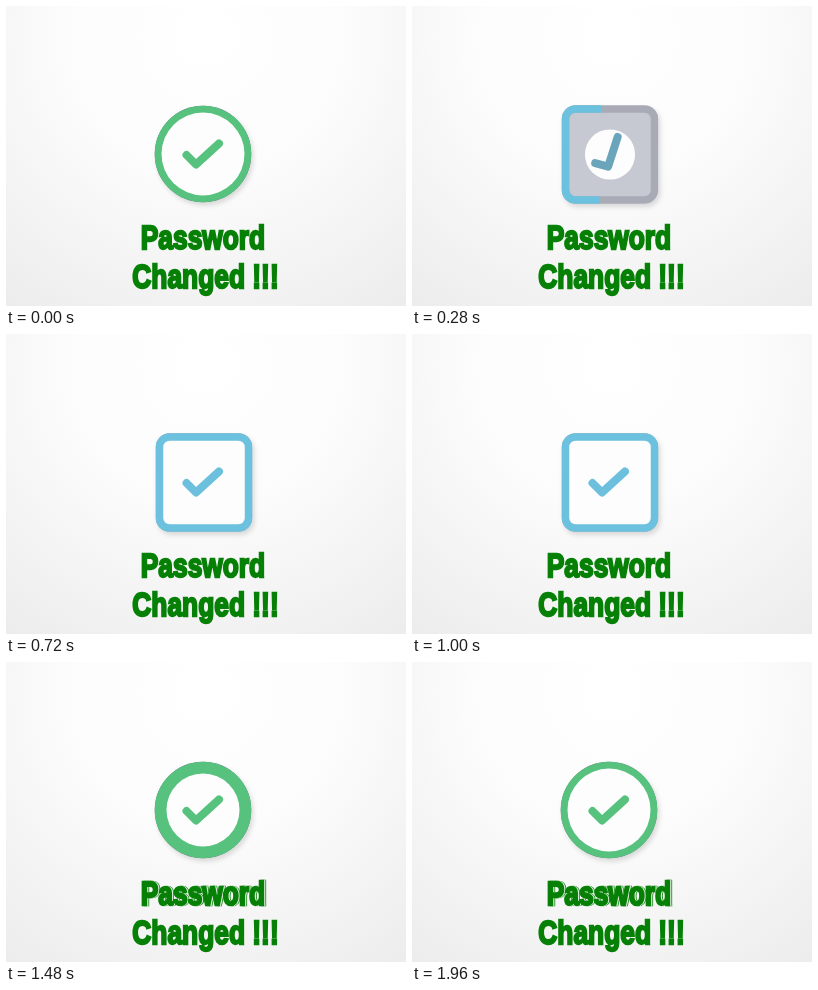
An HTML page that plays this animation: 400 by 300 pixels, repeating every 2 s.

```html
<!DOCTYPE html>
<html lang="en">
<head>
<meta charset="utf-8">
<title>Password changed</title>
<style>
html, body { margin: 0; width: 100%; height: 100%; overflow: hidden; background: #fff; }
svg { display: block; width: 100vw; height: 100vh; }
text {
  font: bold 34px "Liberation Sans", Arial, sans-serif;
  text-anchor: middle;
  stroke-width: 2.3;
}
.ink { fill: #068006; stroke: #068006; }
.pale { fill: #dceadc; stroke: #dceadc; }
</style>
</head>
<body>
<svg viewBox="0 0 400 300">
  <defs>
    <radialGradient id="paper" gradientUnits="userSpaceOnUse" cx="200" cy="30" r="350">
      <stop offset="0" stop-color="#fff"/>
      <stop offset=".4" stop-color="#fcfcfc"/>
      <stop offset="1" stop-color="#ebebeb"/>
    </radialGradient>
    <filter id="shadow" x="-20%" y="-20%" width="150%" height="150%">
      <feDropShadow dx="2" dy="3" stdDeviation="2.5" flood-color="#000" flood-opacity=".14"/>
    </filter>
    <clipPath id="window"><rect id="windowShape"/></clipPath>
  </defs>

  <rect width="400" height="300" fill="url(#paper)"/>

  <g id="square" fill="none" stroke-width="7.5">
    <rect x="153.5" y="103" width="89" height="91" rx="10" fill="#c6c8d2" stroke="#a8abb6" filter="url(#shadow)"/>
    <rect id="squareHole" fill="#fdfdfd"/>
    <path id="progress" stroke="#6cc1de" pathLength="343"
      d="M198 194H163.500a10 10 0 0 1-10-10V113a10 10 0 0 1 10-10H232.500a10 10 0 0 1 10 10V184a10 10 0 0 1-10 10Z"/>
  </g>

  <g id="circle">
    <circle cx="197" cy="148" r="46.500" fill="#f9fafb" stroke="#6b7088" stroke-width="3.500" filter="url(#shadow)"/>
    <circle id="disk" cx="197" cy="148" fill="#57c27d"/>
    <circle id="diskHole" cx="197" cy="148" fill="#fdfdfd"/>
  </g>

  <g clip-path="url(#window)">
    <path id="check" d="M180.500 149L190 158.500L213 137.500" fill="none" stroke-width="8" stroke-linejoin="round" stroke-linecap="round"/>
  </g>

  <!-- condensed poster lettering -->
  <g id="ghost">
    <text class="ink" transform="translate(199 242.8) scale(.775 1)">Password</text>
    <text class="pale" transform="translate(198.200 242.8) scale(.775 1)">Password</text>
  </g>
  <text class="ink" transform="translate(197 242.8) scale(.775 1)">Password</text>
  <text class="ink" transform="translate(199.500 281.8) scale(.775 1)">Changed !!!</text>
</svg>

<script>
const LOOP = 2000, SQUARE_START = 40, CIRCLE_START = 1040;
const el = id => document.getElementById(id);
const set = (id, attrs) => {
  for (const name in attrs) el(id).setAttribute(name, attrs[name]);
};
const show = (id, on) => set(id, { display: on ? "inline" : "none" });

// Piecewise linear value through [time, value] points.
function track(t, ...points) {
  if (t <= points[0][0]) return points[0][1];
  for (let i = 1; i < points.length; i++) {
    const [t0, a] = points[i - 1], [t1, b] = points[i];
    if (t <= t1) return a + (b - a) * (t - t0) / (t1 - t0);
  }
  return points[points.length - 1][1];
}

const box = (cx, cy, half, radius) => ({
  x: cx - half, y: cy - half, width: 2 * half, height: 2 * half, rx: radius
});

function drawSquare(t) {
  const half = track(t, [0, 0], [240, 25], [480, 38.5], [600, 43]);
  const radius = Math.min(half, track(t, [240, 25], [480, 10], [600, 7]));
  const hole = box(198, 148.5, half, radius);
  set("squareHole", hole);
  set("windowShape", hole);

  const length = track(t, [0, 6], [240, 152], [480, 297], [560, 343]);
  const start = track(t, [0, -58], [240, 10], [480, 78], [560, 100]);
  set("progress", {
    "stroke-dasharray": length >= 343 ? "none" : `${length} ${343 - length}`,
    "stroke-dashoffset": -start
  });

  const tone = track(t, [0, 0], [480, 1]);
  const mix = (a, b) => Math.round(a + (b - a) * tone);
  return `rgb(${mix(106, 108)},${mix(138, 192)},${mix(152, 221)})`;
}

function drawCircle(t) {
  const hole = track(t, [120, 0], [240, 14], [440, 36.5], [600, 41.5]);
  set("disk", { r: track(t, [0, 0], [240, 38], [320, 48.3]) });
  set("diskHole", { r: hole });
  set("windowShape", box(197, 148, hole, hole));
  return "#57c27d";
}

function draw(time) {
  const isSquare = time >= SQUARE_START && time < CIRCLE_START;
  const t = isSquare ? time - SQUARE_START
    : (time - CIRCLE_START + LOOP) % LOOP;
  show("square", isSquare);
  show("circle", !isSquare);
  show("ghost", time >= 1400);
  const color = isSquare ? drawSquare(t) : drawCircle(t);
  set("check", {
    stroke: color,
    transform: `rotate(${track(t, [0, -75], [400, 0])} 197 148)`
  });
}

const begin = performance.now();
function tick() {
  draw((performance.now() - begin) % LOOP);
  requestAnimationFrame(tick);
}
tick();
</script>
</body>
</html>
```
